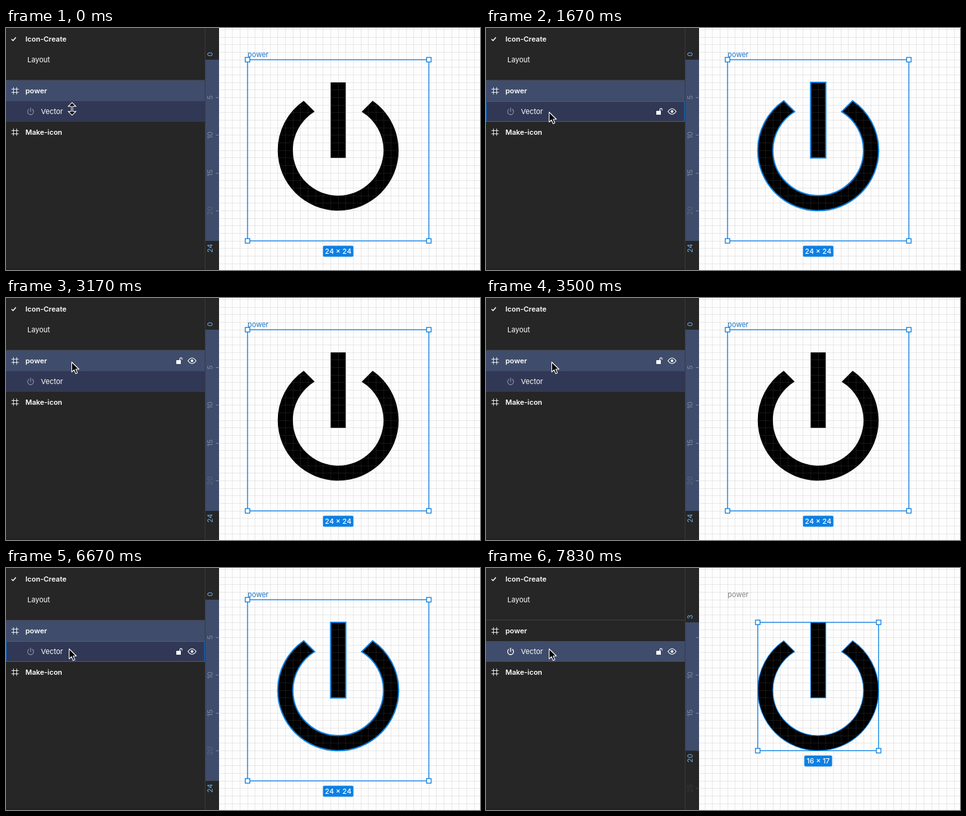
An HTML page that plays this animation: 732 px wide and 374 px high, repeating every 8000 ms.

```html
<!DOCTYPE html>
<html lang="en">
<head>
<meta charset="utf-8">
<title>Layer selection</title>
<style>
  html, body { margin: 0; height: 100%; overflow: hidden; background: #fff; }
  svg { display: block; width: 732px; height: 374px; font: 11px Inter, sans-serif; fill: #fff; }
  .bold { font-weight: 600; }
  .line { fill: none; stroke: #fff; }
  .blue { fill: none; stroke: #0d80e3; }
  .handle { fill: #fff; stroke: #0d80e3; stroke-width: 1.3; }
</style>
</head>
<body>
<svg id="stage" viewBox="0 0 732 374"></svg>
<script>
const LOOP = 8000, STEP = 1000 / 6;
const UNIT = 280 / 24, LEFT = 373, TOP = 49;
const BLUE = '#0d80e3', SELECTED = '#3f4c6b', CHILD = '#313855', PANEL = '#262626';
const POWER = 'M16.56 5.44l-1.45 1.45A5.97 5.97 0 0 1 18 12a6 6 0 0 1-12 0' +
  'c0-2.17 1.16-4.06 2.88-5.12L7.44 5.44A7.96 7.96 0 0 0 4 12a8 8 0 0 0 16 0' +
  'c0-2.72-1.36-5.12-3.44-6.56zM13 3h-2v10h2z';

// Cursor stops: step, x, y
const STOPS = [[0, 102, 125], [2, 98, 127], [9, 97.5, 130], [12, 97.5, 130], [15, 101.5, 106],
  [17, 101.5, 99], [24, 101.5, 99], [27, 97.5, 121], [33, 97.5, 121], [36, 97.5, 125], [48, 97.5, 125]];

const at = (x, y, body, more = '') => `<g transform="translate(${x} ${y}) ${more}">${body}</g>`;
const rect = (x, y, w, h, attrs) => `<rect x="${x}" y="${y}" width="${w}" height="${h}" ${attrs}/>`;
const path = (d, attrs) => `<path d="${d}" ${attrs}/>`;
const text = (x, y, s, attrs = '') => `<text x="${x}" y="${y}" ${attrs}>${s}</text>`;
const canvasX = u => LEFT + u * UNIT, canvasY = u => TOP + u * UNIT;

function cursorAt(step) {
  const i = STOPS.findIndex(s => s[0] > step);
  const [t0, x0, y0] = STOPS[i - 1], [t1, x1, y1] = STOPS[i];
  const k = (step - t0) / (t1 - t0);
  return [x0 + (x1 - x0) * k, y0 + (y1 - y0) * k];
}

function hoverAt(step) {
  if (step < 2) return '';
  return step < 16 || step >= 26 ? 'vector' : 'power';
}

const selectedAt = step => (step >= 11 && step < 18) || step >= 41 ? 'vector' : 'power';

function iconShape(attrs, x = LEFT, y = TOP, scale = UNIT) {
  return at(x, y, path(POWER, `vector-effect="non-scaling-stroke" ${attrs}`), `scale(${scale})`);
}

function grid() {
  let d = '';
  for (let k = -4; k <= 31; k++) {
    const x = Math.floor(canvasX(k)) + .5, y = Math.floor(canvasY(k)) + .5;
    if (x > 329) d += `M${x} 0V374`;
    d += `M329 ${y}H732`;
  }
  return path(d, 'fill="none" stroke="#808080" stroke-opacity=".16"');
}

function selectionBox(x0, y0, x1, y1, label, badgeWidth) {
  const [l, t, r, b] = [canvasX(x0), canvasY(y0), canvasX(x1), canvasY(y1)];
  const mid = (l + r) / 2;
  let out = rect(l, t, r - l, b - t, 'class="blue" stroke-width="1.3"');
  for (const x of [l, r]) for (const y of [t, b]) out += rect(x - 3.5, y - 3.5, 7, 7, 'class="handle"');
  return out + rect(mid - badgeWidth / 2, b + 7.5, badgeWidth, 17, `rx="2" fill="${BLUE}"`) +
    text(mid, b + 20, label, 'text-anchor="middle" font-weight="500"');
}

function canvasArea(selected, hover) {
  const vector = selected === 'vector', outer = hover === 'power' && vector;
  const outline = vector ? 1.2 : hover === 'vector' ? 2 : 0;
  return rect(329, 0, 403, 374, 'fill="#fdfdfd"') + iconShape('fill="#000"') + grid() +
    text(LEFT, 45, 'power', `fill="${vector && !outer ? '#858585' : '#1b79cf'}"`) +
    (outline ? iconShape(`class="blue" stroke-width="${outline}"`) : '') +
    (outer ? rect(LEFT, TOP, 280, 280, 'class="blue" stroke-width="2"') : '') +
    (vector ? selectionBox(4, 3, 20, 20, '16 × 17', 43) : selectionBox(0, 0, 24, 24, '24 × 24', 47));
}

function ruler(selected) {
  const [from, to] = selected === 'vector' ? [3, 20] : [0, 24];
  const label = (n, y, color) => at(319, y, text(0, 0, n, `text-anchor="middle" fill="${color}"`), 'rotate(-90)');
  let out = rect(307, 0, 22, 374, `fill="${PANEL}"`) + rect(307, 0, 1, 374, 'fill="#3a3a3a"') +
    rect(308, canvasY(from), 21, (to - from) * UNIT, `fill="${SELECTED}"`);
  for (let n = 5; n <= 25; n += 5) {
    const y = canvasY(n), inside = n > from && n < to;
    if (n <= to || to === 20) out += rect(324, Math.floor(y), 5, 1, `fill="${inside ? '#7c869d' : '#444'}"`);
    const gap = Math.min(Math.abs(n - from), Math.abs(n - to));
    if (inside && gap > 2) out += label(n, y, n === 20 ? '#5c677f' : '#8089a0');
  }
  if (to === 20) out += label(25, canvasY(25), '#383838');
  return out + label(from, canvasY(from) - 8.5, '#6fb0ea') + label(to, canvasY(to) + 11.5, '#6fb0ea');
}

function rowTools(y) {
  return rect(263, y - 1, 7, 6, 'rx=".6"') + path(`M268.5 ${y - 1}v-2a1.7 1.7 0 0 1 3.4 0v1.5`, 'class="line" stroke-width="1.1"') +
    path(`M281 ${y}q6.3-8.6 12.6 0q-6.3 8.6-12.6 0z`, 'class="line" stroke-width="1.1"') +
    `<circle cx="287.3" cy="${y}" r="2.1"/>`;
}

const frameIcon = y => path(`M11.5 ${y - 5.5}v11M16.5 ${y - 5.5}v11M8.5 ${y - 2.5}h11M8.5 ${y + 2.5}h11`,
  'class="line" stroke-opacity=".85"');

function layers(step, selected, hover) {
  const vector = selected === 'vector';
  const toolRow = hover === 'power' ? 97 : 129;
  let out = rect(0, 0, 307, 374, `fill="${PANEL}"`) + rect(0, 80, 307, 1, 'fill="#3e3e3e"') +
    rect(0, 371, 307, 3, 'fill="#222"');
  if (!vector) out += rect(0, 81, 307, 32, `fill="${SELECTED}"`);
  out += rect(0, 113, 307, 32, `fill="${vector ? SELECTED : CHILD}"`);
  if (hover && hover !== selected && step !== 15)
    out += rect(.5, toolRow - 15.5, 306, 31, 'fill="none" stroke="#0b6dc9"');
  if (hover) out += rowTools(toolRow);
  return out + path('M8.5 17.2l2.4 2.3 4.4-5', 'class="line" stroke-width="1.5"') +
    text(30, 21, 'Icon-Create', 'class="bold"') + text(33, 53, 'Layout') +
    frameIcon(97) + text(30, 101, 'power', 'class="bold"') +
    iconShape(`fill="${vector ? '#fff' : '#858a9b'}"`, 30.2, 121.4, .65) + text(54, 133, 'Vector') +
    frameIcon(161) + text(30, 165, 'Make-icon', 'class="bold"');
}

function cursor(step) {
  const [x, y] = cursorAt(step);
  if (step < 2) {
    const d = 'M-3.5-5L0-8.5 3.5-5zM-3.5 5L0 8.5 3.5 5zM0-6V6';
    return at(x, y, path(d, 'fill="#fff" stroke="#fff" stroke-width="3"') + path(d, 'fill="#000" stroke="#000"'));
  }
  return at(x, y, path('M0 0V15.4L3.6 12 6.2 18 8.8 16.8 6.3 11H11.2z',
    'fill="#000" stroke="#fff" stroke-width="1.1" stroke-linejoin="round"'));
}

const stage = document.getElementById('stage');
let shown = -1;

function draw(now) {
  const step = Math.floor((now % LOOP + 5) / STEP) % 48;
  if (step !== shown) {
    const selected = selectedAt(step), hover = hoverAt(step);
    stage.innerHTML = canvasArea(selected, hover) + layers(step, selected, hover) + ruler(selected) + cursor(step);
    shown = step;
  }
  requestAnimationFrame(draw);
}
draw(0);
</script>
</body>
</html>
```
